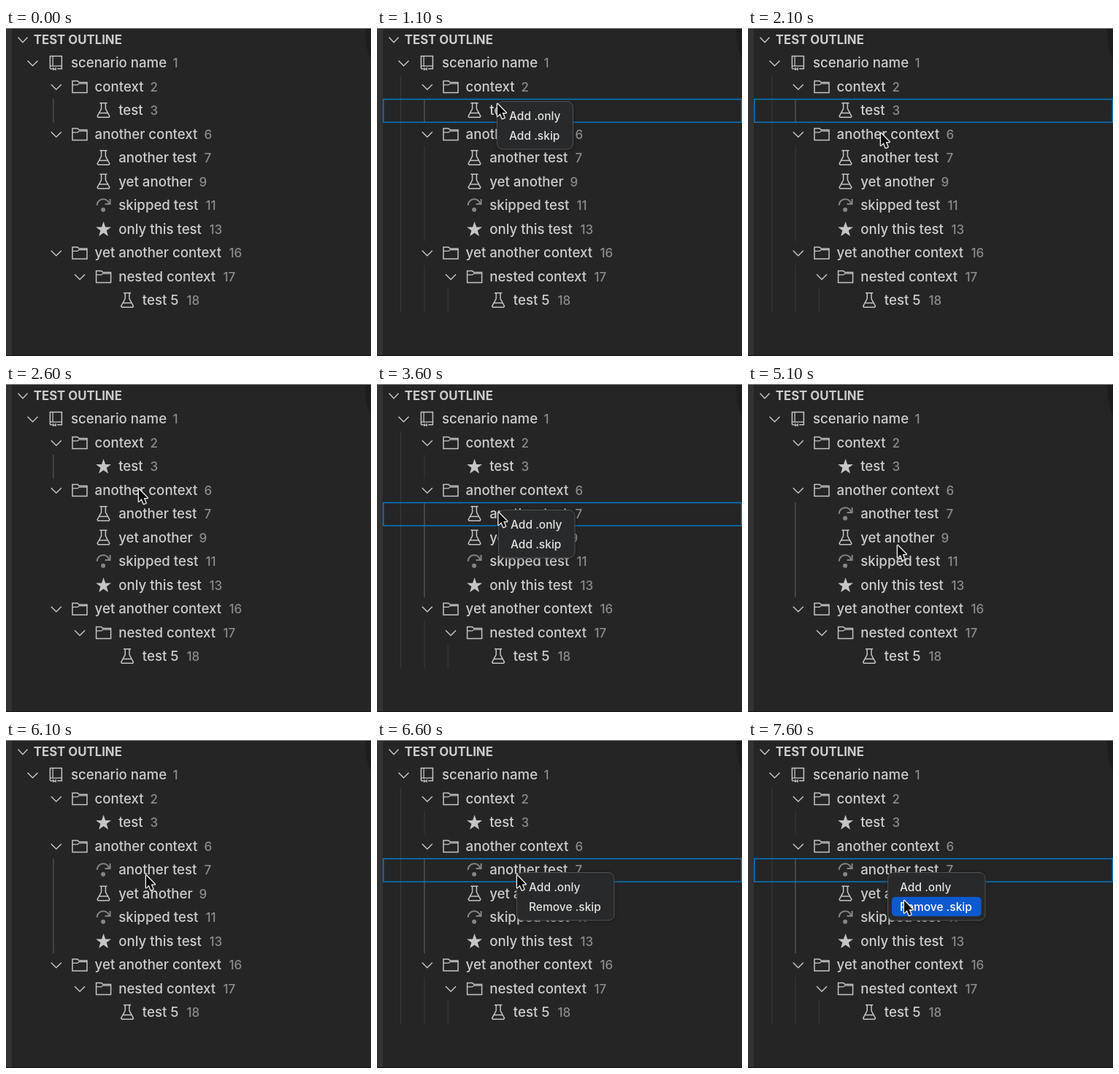
These frames come from a looping animation (500x449 px, 8 s). An HTML page with a canvas:

```html
<!DOCTYPE html>
<html lang="en">
<head>
<meta charset="utf-8">
<title>Test outline</title>
<style>
html, body { margin: 0; width: 100%; height: 100%; overflow: hidden; background: #252526; }
canvas { display: block; }
</style>
</head>
<body>
<canvas id="stage" width="500" height="449"></canvas>
<script>
const ctx = document.getElementById('stage').getContext('2d');
const LOOP = 8000;
const ICON = '#c5c5c5', DIM = '#858585', TEXT = '#cccccc';
const FONT = 'Inter, "Open Sans", sans-serif';

// label, line number, number x, icon, indent level
const rows = [
  ['scenario name', 1, 228, 'book', 0],
  ['context', 2, 197, 'folder', 1],
  ['test', 3, 197, 'flask', 2],
  ['another context', 6, 271, 'folder', 1],
  ['another test', 7, 271, 'flask', 2],
  ['yet another', 9, 264, 'flask', 2],
  ['skipped test', 11, 273, 'skip', 2],
  ['only this test', 13, 278, 'star', 2],
  ['yet another context', 16, 305, 'folder', 1],
  ['nested context', 17, 297, 'folder', 2],
  ['test 5', 18, 247, 'flask', 3]
];
const rowY = i => 48 + 32.5 * i;

const menus = {
  only: { x: 164.5, y: 100.5, w: 104, items: ['Add .only', 'Add .skip'] },
  skip: { x: 166.5, y: 172.5, w: 104.5, items: ['Add .only', 'Add .skip'] },
  unskip: { x: 191.5, y: 181.5, w: 133.5, items: ['Add .only', 'Remove .skip'] }
};

// Each step holds until the next; "group" is the row range with the active guide.
const first = [2, 2], second = [4, 7];
const steps = [
  { at: 0, group: first },
  { at: 100, group: first, cursor: [402, 223] },
  { at: 600, group: first, cursor: [164.5, 103] },
  { at: 1100, group: first, focus: 2, menu: 'only', cursor: [164.5, 103] },
  { at: 1600, group: first, focus: 2, menu: 'only', pick: 0, cursor: [181, 117] },
  { at: 2100, group: first, focus: 2, cursor: [181.5, 143] },
  { at: 2600, group: first, starred: true, cursor: [181.5, 143] },
  { at: 3100, group: first, starred: true, cursor: [166, 175] },
  { at: 3600, group: second, starred: true, focus: 4, menu: 'skip', cursor: [166, 175] },
  { at: 4100, group: second, starred: true, focus: 4, menu: 'skip', pick: 1, cursor: [202, 217] },
  { at: 4600, group: second, starred: true, focus: 4, cursor: [204.5, 220] },
  { at: 5100, group: second, starred: true, skipped: true, cursor: [204.5, 220] },
  { at: 5600, group: second, starred: true, skipped: true, cursor: [194, 198.5] },
  { at: 6100, group: second, starred: true, skipped: true, cursor: [191.5, 184.5] },
  { at: 6600, group: second, starred: true, skipped: true, focus: 4, menu: 'unskip', cursor: [191.5, 184.5] },
  { at: 7100, group: second, starred: true, skipped: true, focus: 4, menu: 'unskip', pick: 1, cursor: [208, 215] },
  { at: 7600, group: second, starred: true, skipped: true, focus: 4, menu: 'unskip', pick: 1, cursor: [213.5, 219] }
];

function text(str, x, y, size, color, weight = 500) {
  ctx.font = `${weight} ${size}px ${FONT}`;
  ctx.fillStyle = color;
  ctx.fillText(str, x, y);
}

function line(points, color = ICON, width = 1.5, closed = false) {
  ctx.beginPath();
  points.forEach(([x, y]) => ctx.lineTo(x, y));
  if (closed) ctx.closePath();
  ctx.strokeStyle = color;
  ctx.lineWidth = width;
  ctx.stroke();
}

function box(x, y, w, h, r, fill, stroke) {
  ctx.beginPath();
  ctx.roundRect(x, y, w, h, r);
  if (fill) { ctx.fillStyle = fill; ctx.fill(); }
  if (stroke) { ctx.strokeStyle = stroke; ctx.lineWidth = 1; ctx.stroke(); }
}

function chevron(x, y, half = 7) {
  line([[x - half, y - 3.2], [x, y + 3.7], [x + half, y - 3.2]]);
}

// Icons are drawn around their own centre.
const icons = {
  book() {
    line([[-8.3, 7.5], [-8.3, -9.5], [7.7, -9.5], [7.7, 7.8], [1.5, 7.8]]);
    line([[-8.3, 7.8], [-5, 7.8]]);
    line([[-8.3, 4], [7.7, 4]], ICON, 1.3);
    line([[-4.6, -9.5], [-4.6, 4]], ICON, 1.3);
    line([[-4, 6], [-4, 9.3], [-2.3, 8], [-0.6, 9.3], [-0.6, 6]], ICON, 1.3);
  },
  folder() {
    line([[-10.3, -8], [-3.3, -8], [-1.1, -6], [9.7, -6], [9.7, 8], [-10.3, 8]], ICON, 1.5, true);
    line([[-10.3, -2.6], [-3.3, -2.6], [-1.1, -4.4], [9.7, -4.4]], ICON, 1.2);
  },
  flask() {
    line([[-5.5, -10.3], [4.7, -10.3]]);
    line([[-3.3, -10.3], [-3.3, -2.5], [-8.8, 7.6], [-7.8, 9.2], [7, 9.2], [8, 7.6], [2.5, -2.5], [2.5, -10.3]]);
    line([[-6.3, 3.4], [5.5, 3.4]]);
  },
  star() {
    ctx.beginPath();
    for (let i = 0; i < 10; i++) {
      const r = i % 2 ? 4.4 : 11, a = i * Math.PI / 5;
      ctx.lineTo(r * Math.sin(a) - 0.3, 0.5 - r * Math.cos(a));
    }
    ctx.closePath();
    ctx.fillStyle = ICON;
    ctx.fill();
  },
  skip() {
    ctx.beginPath();
    ctx.arc(-0.8, -0.3, 8.4, Math.PI, Math.PI * 1.93);
    ctx.strokeStyle = DIM;
    ctx.lineWidth = 2.1;
    ctx.stroke();
    line([[8.7, -9], [8.7, -2], [1.7, -2]], DIM, 2);
    ctx.beginPath();
    ctx.arc(-0.8, 5.7, 3, 0, Math.PI * 2);
    ctx.fillStyle = DIM;
    ctx.fill();
  }
};

function drawIcon(name, x, y) {
  ctx.save();
  ctx.translate(x, y);
  icons[name]();
  ctx.restore();
}

function guide(level, from, to, color) {
  ctx.fillStyle = color;
  ctx.fillRect(32 + 32.3 * level, rowY(from) - 16, 1.2, (to - from + 1) * 32.5);
}

function drawRow([label, number, numberX, icon, level], y) {
  const x = 32.6 * level;
  if (icon === 'book' || icon === 'folder') chevron(36.5 + 32.3 * level, y);
  drawIcon(icon, 68.7 + x, y);
  text(label, 89 + x, y + 6.3, 18.65, TEXT);
  text(String(number), numberX + 0.4, y + 6.3, 17, '#8b8b8b');
}

function drawMenu({ x, y, w, items }, pick) {
  ctx.save();
  ctx.shadowColor = 'rgba(0,0,0,.45)';
  ctx.shadowBlur = 5;
  ctx.shadowOffsetY = 1;
  box(x, y, w, 65.5, 8, '#28292a');
  ctx.restore();
  box(x, y, w, 65.5, 8, null, '#515253');
  items.forEach((item, i) => {
    const mid = y + 19.5 + 27 * i;
    if (i === pick) box(x + 5.5, mid - 13.3, w - 11, 26.6, 5, '#0d59cf');
    text(item, x + 16.5, mid + 5.8, 15.5, i === pick ? '#ffffff' : '#e2e2e2');
  });
}

function drawCursor([x, y]) {
  ctx.save();
  ctx.translate(x + 0.5, y + 1);
  ctx.scale(0.95, 0.95);
  ctx.lineJoin = 'round';
  const arrow = [[0, 0], [0, 17.5], [4, 13.8], [7, 21], [10, 19.7], [7, 12.7], [12.3, 12.6]];
  line(arrow, '#ededed', 2.8, true);
  ctx.fillStyle = '#0b0b0b';
  ctx.fill();
  ctx.restore();
}

function drawFrame() {
  ctx.fillStyle = '#252526';
  ctx.fillRect(0, 0, 500, 449);
  ctx.fillStyle = '#323233';
  ctx.fillRect(0, 0, 8, 449);
  // shaded corner at the top right
  ctx.fillStyle = '#1d1d1e';
  ctx.beginPath();
  ctx.moveTo(492, 0);
  ctx.quadraticCurveTo(492, 30, 500, 42);
  ctx.lineTo(500, 0);
  ctx.fill();
  ctx.fillStyle = '#8e8e8e';
  ctx.fillRect(0, 0, 500, 1);
  ctx.fillStyle = '#161616';
  ctx.fillRect(0, 448, 500, 1);
  chevron(23, 16, 6.5);
  text('TEST OUTLINE', 37.8, 22, 16.8, TEXT, 700);
}

function draw(step) {
  drawFrame();
  const focused = step.focus !== undefined;
  if (focused) {
    [[0, 1, 10], [1, 2, 2], [1, 4, 7], [1, 9, 10], [2, 10, 10]]
      .forEach(([level, from, to]) => guide(level, from, to, '#373737'));
  }
  guide(1, ...step.group, '#565656');
  rows.forEach((row, i) => {
    const shown = [...row];
    if (i === 2 && step.starred) shown[3] = 'star';
    if (i === 4 && step.skipped) shown[3] = 'skip';
    drawRow(shown, rowY(i));
  });
  if (focused) {
    ctx.strokeStyle = '#0878c5';
    ctx.lineWidth = 1.5;
    ctx.strokeRect(8.75, rowY(step.focus) - 15.5, 490.75, 31.5);
  }
  if (step.menu) drawMenu(menus[step.menu], step.pick);
  if (step.cursor) drawCursor(step.cursor);
}

function tick() {
  const time = performance.now() % LOOP;
  draw(steps.findLast(step => step.at <= time));
  requestAnimationFrame(tick);
}
tick();
</script>
</body>
</html>
```
